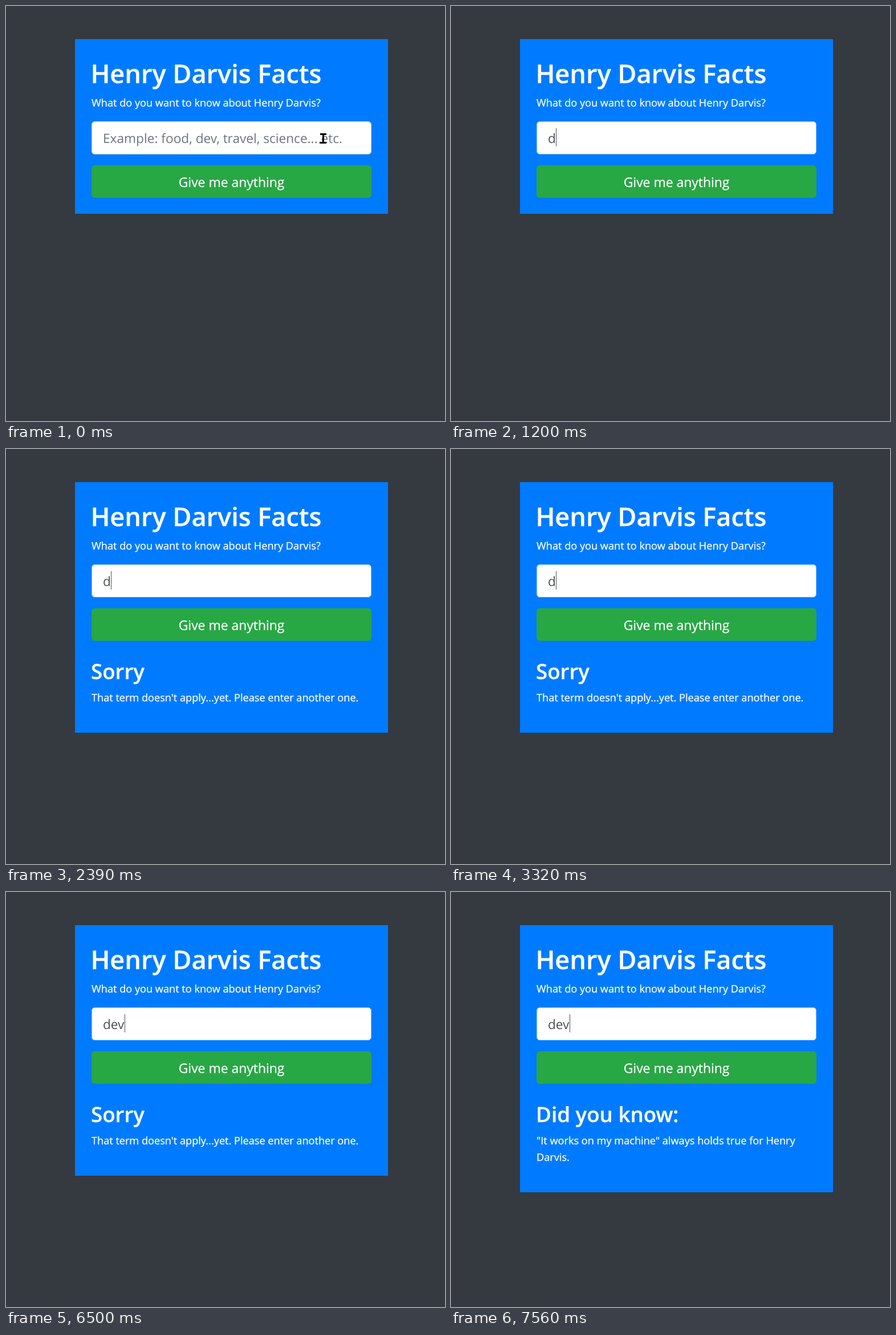
These frames come from a looping animation (770x727 px, 8 s). An HTML page:

```html
<!DOCTYPE html>
<html lang="en">
<head>
<meta charset="utf-8">
<title>Henry Darvis Facts</title>
<style>
  html, body { margin: 0; width: 100%; height: 100%; overflow: hidden; background: #343a40; }
  svg { display: block; }
  text {
    font: 18.15px "Open Sans", "Noto Sans", sans-serif;
    fill: #fff;
    stroke: #fff;
    stroke-width: .3px;
    white-space: pre;
    text-rendering: geometricPrecision;
  }
  .title { font-size: 45.1px; font-weight: 600; }
  .subtitle { font-size: 36.7px; font-weight: 600; }
  .field { font-size: 22.65px; stroke: none; }
  .button { font-size: 22.9px; text-anchor: middle; }
</style>
</head>
<body>
<svg width="770" height="727" viewBox="0 0 770 727">
  <rect id="panel" x="121" y="58" width="549" fill="#007bff"/>
  <text class="title" x="148.5" y="135">Henry Darvis Facts</text>
  <text x="150" y="176">What do you want to know about Henry Darvis?</text>

  <rect id="box" x="150.5" y="202.5" width="490" height="57" rx="5.3" fill="#fff"/>
  <text id="entry" class="field" x="170" y="240"></text>
  <rect id="caret" y="214" width="1" height="32" fill="#495057"/>
  <path id="pointer" d="M551 223h11v3h-4v12h4v3h-12v-3h5v-12h-4z" fill="#000"/>

  <rect x="150" y="279" width="491" height="57" rx="5.8" fill="#28a745"/>
  <text class="button" x="395.5" y="317">Give me anything</text>

  <text id="heading" class="subtitle" x="149" y="403"></text>
  <text id="line1" x="150" y="442"></text>
  <text id="line2" x="150" y="471"></text>
</svg>
<script>
const LOOP = 8000, FOCUS = 70, BLINK = 530, FADE = 200;
const $ = id => document.getElementById(id);

// Every keystroke moves the caret and restarts its blink.
const typing = [
  { at: FOCUS, text: "", caret: 170 },
  { at: 1200, text: "d", caret: 184 },
  { at: 3920, text: "de", caret: 196 },
  { at: 5440, text: "dev", caret: 208 }
];

const answers = [
  { at: 0, bottom: 364, lines: ["", "", ""] },
  { at: 2390, bottom: 497,
    lines: ["Sorry", "That term doesn't apply...yet. Please enter another one.", ""] },
  { at: 6630, bottom: 526,
    lines: ["Did you know:", "\"It works on my machine\" always holds true for Henry", "Darvis."] }
];

const latest = (steps, t) => steps.findLast(step => step.at <= t);
const show = (id, visible) => $(id).setAttribute("visibility", visible ? "visible" : "hidden");

function setText(id, text) {
  if ($(id).textContent !== text) $(id).textContent = text;
}

function borderColor(t) {
  const p = Math.min(1, Math.max(0, (t - FOCUS) / FADE));
  const eased = p * p * (3 - 2 * p);
  const from = [206, 212, 218], to = [128, 189, 255];
  return `rgb(${from.map((c, i) => Math.round(c + (to[i] - c) * eased))})`;
}

function draw(t) {
  const typed = latest(typing, t);
  const answer = latest(answers, t);

  setText("entry", typed?.text || "Example: food, dev, travel, science... etc.");
  $("entry").style.fill = typed?.text ? "#495057" : "#6c757d";
  $("box").setAttribute("stroke", borderColor(t));

  show("pointer", !typed);
  show("caret", typed && Math.floor((t - typed.at) / BLINK) % 2 === 0);
  if (typed) $("caret").setAttribute("x", typed.caret);

  $("panel").setAttribute("height", answer.bottom - 58);
  ["heading", "line1", "line2"].forEach((id, i) => setText(id, answer.lines[i]));
}

const start = performance.now();
function tick() {
  draw((performance.now() - start) % LOOP);
  requestAnimationFrame(tick);
}
tick();
</script>
</body>
</html>
```
